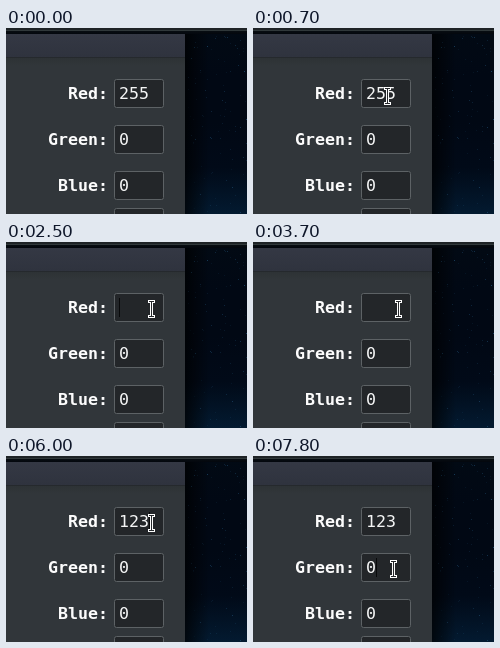
Recreate the animation shown at these times as an HTML page with a canvas. Size 241x186 px, loop 8 s.

```html
<!DOCTYPE html>
<html lang="en">
<head>
<meta charset="utf-8">
<title>Colour fields</title>
<style>
  html, body { margin: 0; width: 100%; height: 100%; overflow: hidden; background: #020812; }
  canvas { display: block; }
</style>
</head>
<body>
<canvas id="stage" width="241" height="186"></canvas>
<script>
const W = 241, H = 186, LOOP = 8000, STEP = 100;
const ctx = document.getElementById('stage').getContext('2d', { alpha: false });
const FONT = '16.6px "DejaVu Sans Mono", monospace';
const CHAR = 10, TEXT_X = 113, FIELD_X = 108, ROW = 46, TOP = 51, FIELD_H = 29;
const CLICK = 1800, ERASE = 1900, TYPE = 5100, COMMIT = 6000, NEXT_CLICK = 7800, BLINK = 1200;

// pointer stops: time, x, y, ease-out power of the way there
const stops = [
  [200, 101.5, 140, 1],
  [900, 142, 53, 1.4],
  [1300, 145.9, 67, 2.2],
  [6600, 145.9, 67, 1],
  [6900, 145.9, 79, 1],
  [7300, 140.5, 113, 1]
];

const clamp = (v, lo, hi) => Math.min(hi, Math.max(lo, v));

function rect(x, y, w, h, color) {
  ctx.fillStyle = color;
  ctx.fillRect(x, y, w, h);
}

function ramp(x0, y0, x1, y1, ...colors) {
  const g = ctx.createLinearGradient(x0, y0, x1, y1);
  colors.forEach((c, i) => g.addColorStop(i / (colors.length - 1), c));
  return g;
}

function drawText(s, x, y, color, weight = '') {
  ctx.font = weight + ' ' + FONT;
  ctx.fillStyle = color;
  ctx.fillText(s, x, y);
}

function drawSky() {
  rect(179, 0, 62, H, ramp(0, 0, 0, H, '#020a14', '#010814', '#010814', '#010a18', '#031a30'));
  let seed = 17;
  const rnd = () => (seed = seed * 16807 % 2147483647) / 2147483647;
  for (let i = 0; i < 90; i++) {
    const x = 182 + Math.floor(rnd() * 59), y = 7 + Math.floor(rnd() * 178);
    rect(x, y, 1, 1, `rgba(45,105,150,${0.12 + 0.5 * rnd() ** 3})`);
  }
  rect(179, 6, 24, H, ramp(179, 0, 203, 0, 'rgba(0,0,0,.7)', 'rgba(0,0,0,0)'));
}

function drawField(y) {
  ctx.beginPath();
  ctx.roundRect(FIELD_X + 0.5, y + 0.5, 49, FIELD_H - 1, 2);
  ctx.fillStyle = '#232629';
  ctx.fill();
  ctx.lineWidth = 1;
  ctx.strokeStyle = '#5d6265';
  ctx.stroke();
}

function drawWindow() {
  rect(0, 6, 179, 180, '#31363a');
  rect(0, 6, 179, 23, ramp(0, 6, 0, 29, '#343844', '#2f333e'));
  rect(0, 29, 179, 1, '#25292d');
  rect(0, 30, 179, 8, ramp(0, 30, 0, 38, '#2d3235', '#31363a'));
  ['Red:', 'Green:', 'Blue:'].forEach((label, i) => {
    drawText(label, 102 - label.length * CHAR, 71 + i * ROW, '#fcfcfc', 'bold');
    drawField(TOP + i * ROW);
  });
  drawField(180);
}

// Red field: erase one digit per 300 ms, type a value, lose the sign on commit.
function redField(t) {
  if (t < TYPE) {
    const erased = clamp(Math.floor((t - ERASE) / 300) + 1, 0, 3);
    const edited = erased ? ERASE + 300 * (erased - 1) : CLICK;
    return { text: '255'.slice(0, 3 - erased), edited };
  }
  if (t >= COMMIT) return { text: '123', edited: COMMIT };
  const typed = 1 + Math.max(0, Math.floor((t - TYPE) / 100) - 1);
  return { text: '-123'.slice(0, typed), edited: TYPE };
}

function drawValue(row, text, t, edited) {
  const y = row * ROW, x = TEXT_X - (text.length > 3 ? 2 : 0);
  const caretOn = t >= edited && Math.floor((t - edited) / BLINK) % 2 === 0;
  ctx.save();
  ctx.beginPath();
  ctx.rect(TEXT_X, y + 54, 39, 23);
  ctx.clip();
  drawText(text, x, y + 71, '#f4f5f5');
  if (caretOn) rect(x + text.length * CHAR, y + 56, 1, 19, '#08090a');
  ctx.restore();
}

function drawBeam(x, y) {
  rect(x - 3.5, y - 9, 7, 3, '#ffffff');
  rect(x - 1.5, y - 9, 3, 18, '#ffffff');
  rect(x - 3.5, y + 6, 7, 3, '#ffffff');
  rect(x - 2.5, y - 8, 5, 1, '#26292c');
  rect(x - 0.5, y - 8, 1, 16, '#26292c');
  rect(x - 2.5, y + 7, 5, 1, '#26292c');
}

function drawArrow(x, y) {
  ctx.beginPath();
  ctx.moveTo(x, y);
  ctx.lineTo(x, y + 16);
  ctx.lineTo(x + 4.5, y + 11.5);
  ctx.lineTo(x + 11, y + 11.5);
  ctx.closePath();
  ctx.fillStyle = '#16181a';
  ctx.fill();
  ctx.lineWidth = 1;
  ctx.strokeStyle = '#ffffff';
  ctx.stroke();
}

function pointerAt(t) {
  const i = stops.findIndex(s => s[0] > t);
  if (i < 0) return stops[stops.length - 1].slice(1, 3);
  const [t0, x0, y0] = stops[i - 1], [t1, x1, y1, power] = stops[i];
  const k = 1 - (1 - (t - t0) / (t1 - t0)) ** power;
  return [x0 + (x1 - x0) * k, y0 + (y1 - y0) * k];
}

function drawPointer(t) {
  if (t < stops[0][0]) return;
  const [px, py] = pointerAt(t);
  const x = Math.floor(px) + 0.5, y = Math.floor(py);
  const inField = x >= FIELD_X && y >= TOP && (y - TOP) % ROW < FIELD_H;
  (inField ? drawBeam : drawArrow)(x, y);
}

function draw(t) {
  rect(0, 0, W, H, '#04080d');
  drawSky();
  rect(0, 0, W, 3, '#1e2326');
  rect(0, 2, W, 1, '#30383a');
  rect(0, 3, W, 3, ramp(0, 3, 0, 6, '#080d12', '#03070d'));
  drawWindow();
  const red = redField(t);
  drawValue(0, red.text, t, red.edited);
  drawValue(1, '0', t, NEXT_CLICK);
  drawValue(2, '0', t, Infinity);
  drawPointer(t);
}

const start = performance.now();
function tick() {
  const t = (performance.now() - start) % LOOP;
  draw(Math.floor(t / STEP) * STEP);
  requestAnimationFrame(tick);
}
tick();
</script>
</body>
</html>
```
